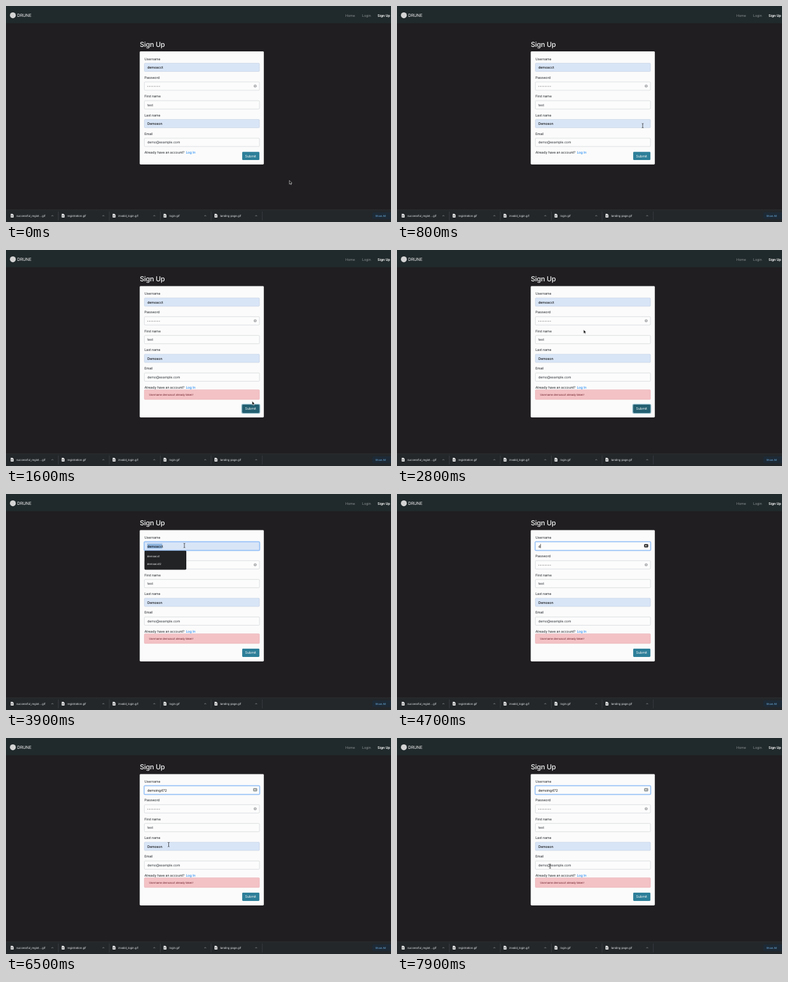
These frames come from a looping animation (600x338 px, 8 s). An HTML page:

```html
<!DOCTYPE html>
<html lang="en">
<head>
<meta charset="utf-8">
<title>Sign Up</title>
<style>
html, body { margin: 0; width: 100%; height: 100%; overflow: hidden; background: #201e21; }
svg { display: block; width: 100vw; height: 100vh; }
text { font-family: Inter, Roboto, sans-serif; font-size: 5.3px; letter-spacing: -.02em; text-rendering: geometricPrecision; white-space: pre; }
</style>
</head>
<body>
<svg id="stage" viewBox="0 0 600 338" xmlns="http://www.w3.org/2000/svg">
  <rect width="600" height="338" fill="#201e21"/>
  <g id="nav"></g>
  <g id="form"></g>
  <g id="bar"></g>
  <path id="arrow" d="M0 0V5.8L1.4 4.6 2.3 6.5 3.2 6.1 2.4 4.2H4.2Z" fill="#111" stroke="#eee" stroke-width=".55"/>
  <path id="beam" d="M-1.3 -3.4Q0 -3.4 0 -2.6Q0 -3.4 1.3 -3.4M0 -2.6V2.6M-1.3 3.4Q0 3.4 0 2.6Q0 3.4 1.3 3.4" fill="none" stroke="#222" stroke-width=".7"/>
</svg>
<script>
const $ = id => document.getElementById(id);
const LOOP = 8000, SHIFT = -14.5, FIELD_X = 215.6, FIELD_W = 179.4, FIELD_H = 13, STEP = 29.35, TOP = 89.5;

function add(parent, tag, attrs, text) {
  const el = document.createElementNS("http://www.w3.org/2000/svg", tag);
  for (const k in attrs) el.setAttribute(k, attrs[k]);
  if (text !== undefined) el.textContent = text;
  parent.appendChild(el);
  return el;
}
const rect = (p, x, y, width, height, fill, more) => add(p, "rect", { x, y, width, height, fill, ...more });
// y is the middle of the capitals
function label(p, text, x, y, size = 5.3, fill = "#212529", weight = 400) {
  return add(p, "text", { x, y: y + size * .363, fill, "font-weight": weight, style: `font-size:${size}px` }, text);
}
const show = (el, on) => el.setAttribute("visibility", on ? "visible" : "hidden");
const put = (el, x, y) => el.setAttribute("transform", `translate(${x} ${y})`);

// navigation bar
const nav = $("nav");
rect(nav, 0, 0, 600, 27, "#20292b");
add(nav, "circle", { cx: 10.7, cy: 14.6, r: 4.6, fill: "#d4d4d4" });
label(nav, "DRUNE", 17.3, 14.8, 6.6, "#f4f4f4");
label(nav, "Home", 529, 14.8, 5.4, "#8d9294");
label(nav, "Login", 555, 14.8, 5.4, "#8d9294");
label(nav, "Sign Up", 579, 14.8, 5.4, "#fff", 600);

// download bar
const bar = $("bar");
rect(bar, 0, 319, 600, 19, "#23272a");
rect(bar, 0, 318.6, 600, .6, "#34373a");
["successful_regist....gif", "registration.gif", "invalid_login.gif", "login.gif", "landing page.gif"].forEach((name, i) => {
  const x = i * 79.4;
  add(bar, "path", { d: `M${x + 7.4} 325.2h2.8l1.6 1.6v4.2h-4.4z`, fill: "#f1f1f1" });
  rect(bar, x + 8.6, 327.6, 1.8, 1.8, "#55595c");
  label(bar, name, x + 16.2, 328.2, 4.45, "#e4e5e6");
  add(bar, "path", { d: `M${x + 70.9} 329l1.4 -1.4l1.4 1.4`, fill: "none", stroke: "#a0a3a5", "stroke-width": .7 });
  rect(bar, x + 81.3, 321.5, .6, 14, "#45494c");
});
rect(bar, 571, 323, 31, 10.5, "#1d2a36", { rx: 2 });
label(bar, "Show All", 575.5, 328.2, 4.2, "#6fb1e6");

// sign-up form
const form = $("form");
label(form, "Sign Up", 208.6, 59.8, 10.8, "#f3f3f3", 500);
const card = rect(form, 208.4, 71, 193.4, 177, "#fbfbfb", { rx: 1.4 });

const values = ["demoacct", "", "test", "Demoson", "demo@example.com"];
const fields = ["Username", "Password", "First name", "Last name", "Email"].map((name, i) => {
  const y = TOP + i * STEP, filled = i === 0 || i === 3;
  label(form, name, FIELD_X + .1, y - 6.9);
  const ring = rect(form, FIELD_X - .5, y - .5, FIELD_W + 1, FIELD_H + 1, "none",
    { rx: 1.8, stroke: "#a9cdfa", "stroke-width": 1.4, visibility: "hidden" });
  const box = rect(form, FIELD_X, y, FIELD_W, FIELD_H, filled ? "#d8e5f7" : "#fcfcfc",
    { rx: 1.2, stroke: filled ? "#c3cfdf" : "#c9cdd1", "stroke-width": .6 });
  const mark = i ? null : rect(form, 220, y + 2.6, 23.5, 7.8, "#8fb5df", { visibility: "hidden" });
  const text = label(form, values[i], 220.2, y + 6.6, 5.3, filled ? "#111" : "#33383d", filled ? 500 : 400);
  return { y, ring, box, mark, text };
});
const user = fields[0];
add(form, "path", { d: "M220.9 125.8h19", stroke: "#444", "stroke-width": 1.1, "stroke-linecap": "round", "stroke-dasharray": "0 2.6" });
add(form, "circle", { cx: 388.3, cy: 125.2, r: 2.3, fill: "#a3a6a8" });
add(form, "circle", { cx: 388.3, cy: 124.7, r: .8, fill: "#eee" });
rect(form, 387.9, 125, .8, 1.6, "#eee");

const key = add(form, "g", {});
const keyBox = rect(key, 385.4, 93.2, 5.8, 4.6, "#222", { rx: .8, stroke: "#222", "stroke-width": .5 });
add(key, "circle", { cx: 387.6, cy: 95.5, r: .9, fill: "#f5f5f5" });
rect(key, 388.4, 95.1, 1.7, .8, "#f5f5f5");
const caret = rect(form, 0, 92.6, .6, 6.6, "#111");

label(form, "Already have an account?", 215.8, 229.5);
label(form, "Log In", 280.4, 229.5, 5.3, "#087cf0");

const alertBox = add(form, "g", {});
rect(alertBox, FIELD_X, 233.2, FIELD_W, 15.2, "#f3c2c5", { rx: 1.2, stroke: "#e9b0b5", "stroke-width": .6 });
label(alertBox, "Username demoacct already taken!", 223, 240.8, 4.25, "#6b1d25");

const submit = add(form, "g", {});
const halo = rect(submit, 367.5, 227.6, 28, 14, "none", { rx: 1.9, stroke: "#8fbac8", "stroke-width": 1.4 });
const button = rect(submit, 368.1, 228.2, 26.8, 12.8, "#2d7f99", { rx: 1.3 });
label(submit, "Submit", 372.6, 234.6, 5.4, "#f6f6f6");

const menu = add(form, "g", {});
rect(menu, 215.8, 103.2, 65.2, 29.8, "#212325", { rx: 1.4 });
label(menu, "demoacct", 219.8, 111.9, 4.3, "#eee");
label(menu, "demoacct2", 219.8, 124.1, 4.3, "#eee");

// pointer stops: time, x, y
const path = [
  [0, 441.6, 273], [300, 382.6, 155.8], [500, 382.6, 155.8], [1200, 383.4, 235.6], [1500, 383.6, 236.6],
  [2100, 383.6, 236.6], [2800, 290.8, 124.8], [3050, 290.8, 124.8], [3500, 278, 80.6],
  [5900, 278, 80.6], [6300, 254.2, 166.8], [6400, 254.2, 166.8], [6500, 253.5, 166.8],
  [6600, 253.5, 166.8], [7300, 239.4, 199.4], [7400, 239.4, 199.4], [7900, 238.6, 200.6]
];
function pointer(t) {
  let i = 1;
  while (i < path.length - 1 && path[i][0] < t) i++;
  const [t0, x0, y0] = path[i - 1], [t1, x1, y1] = path[i];
  const u = Math.max(0, Math.min(1, (t - t0) / (t1 - t0))), e = u * u * (3 - 2 * u);
  return [x0 + (x1 - x0) * e, y0 + (y1 - y0) * e];
}

const typed = "demoing472";
const keys = [4500, 4800, 4900, 5000, 5200, 5200, 5300, 5600, 5700, 5800];

function draw(t) {
  const failed = t >= 1600, dy = failed ? SHIFT : 0;
  const focus = t >= 3500, typing = t >= keys[0];
  put(form, 0, dy);
  card.setAttribute("height", failed ? 205.5 : 177);
  show(alertBox, failed);
  put(submit, 0, failed ? 28.4 : 0);

  const [x, y] = pointer(t);
  const by = failed ? 242.1 : 228.2;
  const hover = x > 368 && x < 395 && y > by && y < by + 12.8;
  const pressed = t >= 1400 && !focus;
  button.setAttribute("fill", pressed || hover ? "#235f71" : "#2d7f99");
  show(halo, pressed);

  show(user.ring, focus);
  user.box.setAttribute("fill", typing ? "#fcfcfc" : "#d8e5f7");
  user.box.setAttribute("stroke", focus ? "#6fa9ee" : "#c3cfdf");
  show(user.mark, t >= 3700 && !typing);
  show(menu, t >= 3600 && !typing);
  user.text.textContent = typing ? typed.slice(0, keys.filter(k => k <= t).length) : values[0];
  user.text.setAttribute("font-weight", typing ? 400 : 500);
  show(key, typing);
  keyBox.setAttribute("fill", t < 6000 ? "#222" : "#8f9694");
  keyBox.setAttribute("stroke", t < 6000 ? "#222" : "#8f9694");
  show(caret, typing && (t < 6100 || (t >= 6700 && t < 7200)));
  if (typing) caret.setAttribute("x", 220.4 + user.text.getComputedTextLength());

  const hidden = typing && t < 6000;
  const inField = x > FIELD_X && x < FIELD_X + FIELD_W &&
    fields.some(f => y > f.y + dy && y < f.y + dy + FIELD_H);
  show($("beam"), !hidden && inField);
  show($("arrow"), !hidden && !inField);
  put($("beam"), x, y);
  put($("arrow"), x, y);
}

const start = performance.now();
function tick() {
  const t = (performance.now() - start) % LOOP;
  draw(Math.floor(t / 100) * 100);
  requestAnimationFrame(tick);
}
tick();
</script>
</body>
</html>
```
